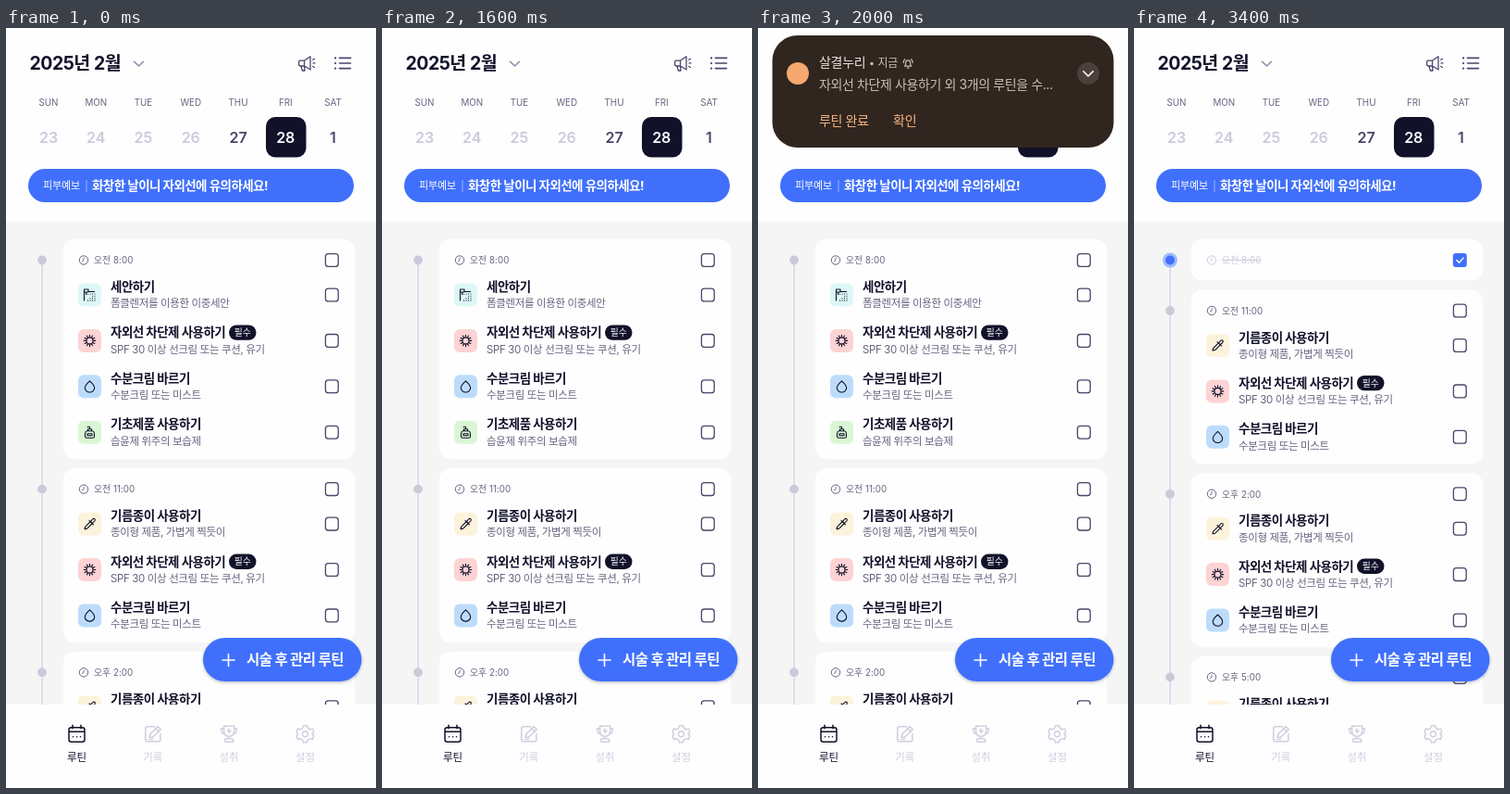
Animation, 400 px wide and 820 px high, one loop 3900 ms. Source, as an HTML page:

```html
<!DOCTYPE html>
<html lang="ko">
<head>
<meta charset="utf-8">
<title>루틴</title>
<style>
  html, body { margin: 0; width: 100%; height: 100%; overflow: hidden; background: #fff; }
  svg { display: block; width: 100%; height: 100%; }
  text { font-family: Inter, "Noto Sans CJK KR", "Noto Sans CJK", sans-serif; white-space: pre; }
  .line { fill: none; stroke-linecap: round; stroke-linejoin: round; }
</style>
</head>
<body>
<svg id="stage" viewBox="0 0 400 820" xmlns="http://www.w3.org/2000/svg"></svg>
<script>
const LOOP = 3900, STEP = 100;
const INK = '#11112a', SLATE = '#47456a', MUTED = '#66647e', PALE = '#cbcadb', BLUE = '#4070fb', WHITE = '#fefeff';

const text = (x, y, size, fill, str, { weight = 400, gap = 0, anchor = 'start' } = {}) =>
  `<text x="${x}" y="${y}" font-size="${size}" fill="${fill}" font-weight="${weight}" letter-spacing="${gap}" text-anchor="${anchor}">${str}</text>`;
const rect = (x, y, w, h, r, fill, extra = '') =>
  `<rect x="${x}" y="${y}" width="${w}" height="${h}" rx="${r}" fill="${fill}" ${extra}/>`;
const circle = (x, y, r, fill, extra = '') => `<circle cx="${x}" cy="${y}" r="${r}" fill="${fill}" ${extra}/>`;
const line = (d, color, width = 1.2) => `<path class="line" d="${d}" stroke="${color}" stroke-width="${width}"/>`;
const at = (x, y, body) => `<g transform="translate(${x} ${y})">${body}</g>`;

// Item icons, drawn around their own centre.
function sunPath() {
  let d = 'M3.5 0A3.5 3.5 0 1 1 -3.5 0A3.5 3.5 0 1 1 3.5 0';
  for (let i = 0; i < 12; i++) {
    const a = i * Math.PI / 6, c = Math.cos(a), s = Math.sin(a);
    d += `M${(c * 4.5).toFixed(2)} ${(s * 4.5).toFixed(2)}L${(c * 6.2).toFixed(2)} ${(s * 6.2).toFixed(2)}`;
  }
  return d;
}
function showerPath() {
  let d = 'M-6 6V-6H-1.5V-3.5M-6 -3H-3.5M-4 -.5Q-4 -3.5 -1 -3.5H5';
  for (let row = 0; row < 4; row++)
    for (let col = 0; col <= row; col++) d += `M${5.5 - col * 2.5} ${-1 + row * 2.3}h.1`;
  return d + 'M-2 -.8h.1M.5 -1h.1M3 -1h.1';
}
const KINDS = {
  wash: { tint: '#dcf8f6', path: showerPath(), title: '세안하기', note: '폼클렌저를 이용한 이중세안' },
  sun: { tint: '#fdd3d4', path: sunPath(), title: '자외선 차단제 사용하기', note: 'SPF 30 이상 선크림 또는 쿠션, 유기', must: true },
  cream: { tint: '#bddcfc', path: 'M0 -6C2.2 -4 5.2 -1.2 5.2 1.5A5.2 4.7 0 0 1 -5.2 1.5C-5.2 -1.2 -2.2 -4 0 -6Z', title: '수분크림 바르기', note: '수분크림 또는 미스트' },
  base: { tint: '#daf6d4', path: 'M-3 -1.5H3Q5 -1 5 1.5V4.5Q5 6 3.5 6H-3.5Q-5 6 -5 4.5V1.5Q-5 -1 -3 -1.5ZM-2 -1.5V-3.5H2V-1.5M0 -3.5V-6H-2.5M-2.5 1.5H2.5V3.5H-2.5Z', title: '기초제품 사용하기', note: '습윤제 위주의 보습제' },
  paper: { tint: '#fdf3dc', path: 'M-5.5 5.5L-4.8 3L.8 -2.6L2.8 -.6L-2.8 5L-5.5 5.5ZM-.5 -3.8L4 .7M1.2 -2.8L3.2 -5.2Q4.8 -6.2 5.6 -5.2Q6.3 -4.2 5.2 -3L3 -1', title: '기름종이 사용하기', note: '종이형 제품, 가볍게 찍듯이' }
};
const MORNING = ['wash', 'sun', 'cream', 'base'], LATER = ['paper', 'sun', 'cream'];

const checkbox = (y, on) => on
  ? rect(344.8, y - 7.4, 15, 14.8, 3, BLUE) + line(`M348.8 ${y}l2.6 2.8l4.6 -5.2`, '#fff', 1.4)
  : rect(345.4, y - 6.9, 13.8, 13.8, 3, 'none', `stroke="${SLATE}" stroke-width="1.3"`);

function item(kind, y) {
  const k = KINDS[kind];
  const badge = rect(241, y - 17, 29.5, 16.4, 8.2, INK) +
    text(255.7, y - 5.2, 9.8, '#fff', '필수', { anchor: 'middle', weight: 500 });
  return rect(78, y - 12.5, 25, 25, 6, k.tint) + at(90.5, y, line(k.path, INK, 1.1)) +
    text(113, y - 4, 13.5, INK, k.title, { weight: 700, gap: -.53 }) + (k.must ? badge : '') +
    text(113, y + 13.3, 11.5, MUTED, k.note, { gap: -.36 }) + checkbox(y, false);
}

function card(top, time, kinds, done) {
  const y = top + 22.5, height = 39.6 + kinds.length * 49.4, color = done ? PALE : MUTED;
  let out = rect(62, top, 315, done ? 44.6 : height, 12, WHITE);
  out += circle(84, y, 4.7, 'none', `stroke="${color}" stroke-width="1"`) + line(`M84 ${y - 2.4}v2.6l-1.7 .9`, color, .9);
  out += text(95, y + 3.8, 9.8, color, time, { gap: .05 }) + checkbox(y, done);
  if (done) out += line(`M95 ${y}H137`, color, .9);
  kinds.forEach((k, i) => out += item(k, top + 60 + i * 49.4));
  out += done ? circle(39, y, 8, '#a0b9fd') + circle(39, y, 5, BLUE) : circle(39, y, 4.9, PALE);
  return out;
}

function list(id, plan) {
  let top = 228, out = rect(38.2, 250, 1.6, 490, 0, '#d9d8e8');
  for (const [time, kinds, done] of plan) {
    out += card(top, time, kinds, done);
    top += (done ? 44.6 : 39.6 + kinds.length * 49.4) + 9.9;
  }
  return `<g id="${id}">${out}</g>`;
}

function header() {
  let out = rect(0, 0, 400, 209, 0, WHITE);
  out += text(25.5, 45.3, 19.5, INK, '2025년 2월', { weight: 700, gap: -.5 });
  out += line('M138.5 36.3L143.5 41L148.5 36.3', '#8a88a6', 1.5);
  out += line('M318 35.2H322.5L329 30.8V45L322.5 41H318Q316.6 41 316.6 39.6V36.6Q316.6 35.2 318 35.2ZM322.5 35.2V41M319 41L320.3 46H323L322.4 41.2M331.6 34.2L333.4 33.2M332 37.9H334M331.6 41.5L333.4 42.5', SLATE, 1.3);
  for (const y of [32.4, 38, 43.6]) out += line(`M356 ${y}h.1`, SLATE, 2.2) + line(`M360.5 ${y}H372.5`, SLATE, 1.6);
  const names = ['SUN', 'MON', 'TUE', 'WED', 'THU', 'FRI', 'SAT'], dates = [23, 24, 25, 26, 27, 28, 1];
  out += rect(281, 96, 43.5, 43.5, 10, INK);
  names.forEach((name, i) => {
    const x = 46 + i * 51.25;
    out += text(x, 84.4, 9.8, MUTED, name, { anchor: 'middle' });
    out += text(x, 123.8, 16, i < 4 ? PALE : i === 5 ? '#fff' : SLATE, dates[i], { weight: 600, anchor: 'middle' });
  });
  out += rect(24, 152, 352, 36, 18, BLUE) + text(40, 173.6, 11, '#fff', '피부예보', { weight: 500, gap: -.15 });
  out += rect(86.5, 164, 1, 13, 0, '#9ab3ff');
  return out + text(93, 174.6, 13.5, '#fff', '화창한 날이니 자외선에 유의하세요!', { weight: 700, gap: -.55 });
}

function nav() {
  const tabs = [
    ['루틴', 'M-6 -7H6Q8.5 -7 8.5 -4.5V6Q8.5 8.5 6 8.5H-6Q-8.5 8.5 -8.5 6V-4.5Q-8.5 -7 -6 -7ZM-8.5 -2.5H8.5M-4.5 -9.5V-6M4.5 -9.5V-6M-4 3h.1M0 3h.1M4 3h.1'],
    ['기록', 'M2 -8H-6Q-8 -8 -8 -6V6Q-8 8 -6 8H6Q8 8 8 6V0M-3.5 3.5L-3 .2L5.2 -8L8.4 -4.8L.2 3.2ZM3 -5.8L6.2 -2.6M-4 5.8H0'],
    ['성취', 'M-5.5 -8.5H5.5V-3Q5.5 2.5 0 2.5Q-5.5 2.5 -5.5 -3ZM-5.5 -6H-8.5Q-8.5 -.5 -4.5 0M5.5 -6H8.5Q8.5 -.5 4.5 0M0 2.5V5M-4.5 8.5V7Q-4.5 5 -2.5 5H2.5Q4.5 5 4.5 7V8.5ZM0 -5.5V-1M-2 -3.2H2'],
    ['설정', 'M-2 -9H2L3 -6.2L5.2 -5L8 -5.5L9.5 -2L7.5 0L9.5 2L8 5.5L5.2 5L3 6.2L2 9H-2L-3 6.2L-5.2 5L-8 5.5L-9.5 2L-7.5 0L-9.5 -2L-8 -5.5L-5.2 -5L-3 -6.2ZM3 0A3 3 0 1 1 -3 0A3 3 0 1 1 3 0']
  ];
  return rect(0, 730, 400, 90, 0, WHITE) + tabs.map(([name, d], i) => {
    const x = 76.5 + i * 82.3, color = i ? '#cfcedd' : INK;
    return at(x, 761.7, line(d, color, 1.5)) + text(x, 791.2, 11.5, color, name, { anchor: 'middle' });
  }).join('');
}

const fab = () => rect(213, 658, 171.5, 47, 23.5, BLUE, 'filter="url(#soft)"') +
  line('M234 682H247M240.5 675.5V688.5', '#fff', 1.6) +
  text(260, 687.3, 15.5, '#fff', '시술 후 관리 루틴', { weight: 700, gap: -.6 });

function notice() {
  const sand = '#cabeb5', peach = '#f9b27f';
  const body = circle(43, 49, 12, '#f5a870') +
    text(66, 42.2, 14, '#ece2db', '살결누리', { weight: 500, gap: -.3 }) +
    circle(123, 38.5, 1.7, sand) + text(129.5, 42.2, 12, sand, '지금', { gap: -.3 }) +
    line('M158.6 41.2Q159.8 40 159.8 37.5Q159.8 34.8 162.2 34.8Q164.6 34.8 164.6 37.5Q164.6 40 165.8 41.2ZM161.5 43.2H163M157.2 37.4Q157.4 35 158.8 33.8M167.2 37.4Q167 35 165.6 33.8', sand, 1.2) +
    text(66, 65.7, 14, sand, '자외선 차단제 사용하기 외 3개의 루틴을 수...', { gap: -.4 }) +
    text(66, 105.2, 14, peach, '루틴 완료', { weight: 500, gap: -.3 }) +
    text(146, 105.2, 14, peach, '확인', { weight: 500, gap: -.2 }) +
    circle(357, 49, 12, '#4b413a') + line('M351.8 46.8L357 52L362.2 46.8', '#fff', 1.6);
  return `<clipPath id="noticeClip">${rect(15.5, 8, 369, 121, 27, '#000', 'id="noticeMask"')}</clipPath>
    <g id="notice">${rect(15.5, 8, 369, 121, 27, '#30261f', 'id="noticeBox"')}
    <g clip-path="url(#noticeClip)"><g id="noticeBody">${body}</g></g></g>`;
}

const $ = id => document.getElementById(id);
$('stage').innerHTML =
  `<defs><filter id="soft" x="-10%" y="-20%" width="120%" height="150%">
    <feDropShadow dx="0" dy="1.5" stdDeviation="1.5" flood-color="#233" flood-opacity=".28"/></filter></defs>` +
  rect(0, 0, 400, 820, 0, '#f5f5f6') +
  list('before', [['오전 8:00', MORNING], ['오전 11:00', LATER], ['오후 2:00', LATER]]) +
  list('after', [['오전 8:00', [], true], ['오전 11:00', LATER], ['오후 2:00', LATER], ['오후 5:00', LATER]]) +
  header() + nav() + fab() + notice();

function noticeState(t) {
  if (t <= 1600 || t >= 3400) return null;
  if (t < 3000) {
    const p = Math.min(1, (t - 1600) / 400), rest = (1 - p) ** 2;
    return { shift: -32 * rest, height: 121 - 80 * rest, alpha: Math.min(1, Math.max(0, (p - .29) * 2)) };
  }
  const p = (t - 2975) / 425;
  return { shift: -.5 - 132 * p * p, height: 121, alpha: 1 };
}

function render(time) {
  const t = Math.floor((time % LOOP) / STEP) * STEP;
  const done = t >= 3000, state = noticeState(t);
  $('before').style.display = done ? 'none' : '';
  $('after').style.display = done ? '' : 'none';
  $('notice').style.display = state ? '' : 'none';
  if (!state) return;
  $('notice').setAttribute('transform', `translate(0 ${state.shift})`);
  $('noticeBox').setAttribute('height', state.height);
  $('noticeMask').setAttribute('height', state.height);
  $('noticeBody').setAttribute('opacity', state.alpha);
}

const start = performance.now();
function tick() {
  render(performance.now() - start);
  requestAnimationFrame(tick);
}
tick();
</script>
</body>
</html>
```
